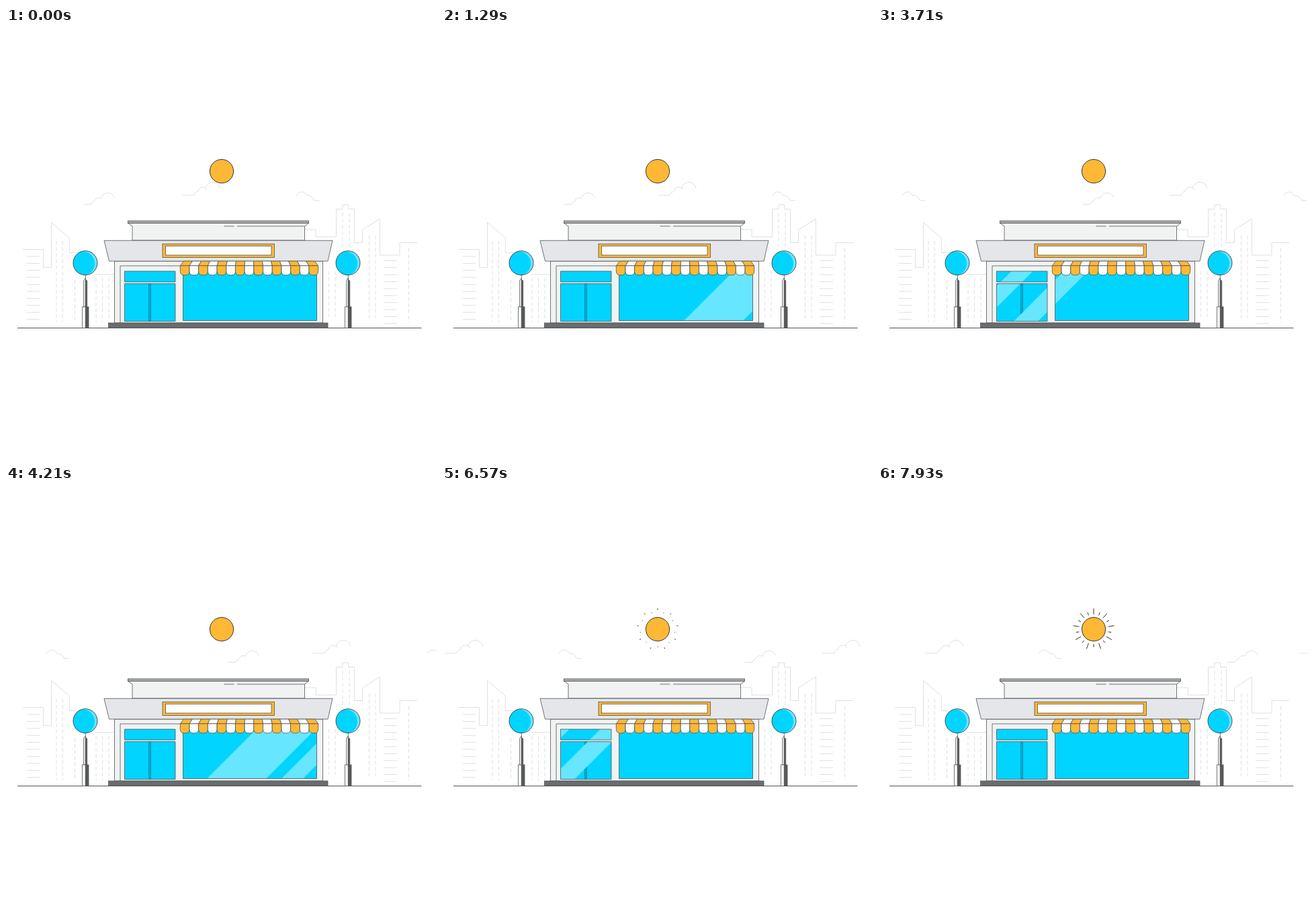
These frames come from a looping animation (640x640 px, 8 s). An HTML page:

```html
<!DOCTYPE html>
<html lang="en">
<head>
<meta charset="utf-8">
<title>Corner shop</title>
<style>
html, body { margin: 0; width: 100%; height: 100%; overflow: hidden; background: #fff; }
svg { display: block; width: 100vw; height: 100vh; }
.far { fill: none; stroke: #dcdcdc; stroke-width: .9; }
.dash { stroke-dasharray: 5.5 3.6; }
.ink { stroke: #505356; stroke-width: .8; }
.wall { fill: #f1f3f3; }
.glass { fill: #00d4ff; }
.shine { fill: #66e6ff; }
.gold { fill: #ffb836; }
.none { fill: none; }
</style>
</head>
<body>
<svg viewBox="0 0 640 640">
  <defs>
    <clipPath id="panes">
      <path d="M176.5 362H252V378H176.5ZM176.5 380.5H252V436.5H176.5ZM263.5 355H462.5V435.5H263.5Z"/>
    </clipPath>
    <clipPath id="crown"><circle cx="118" cy="349.7" r="18"/></clipPath>
    <g id="tree">
      <path class="ink none" d="M118.3 367V374"/>
      <path class="ink" fill="#fff" d="M115.6 415V376L118.3 372V415Z"/>
      <path class="ink" fill="#58595b" d="M118.3 374.5L120.7 376V415H118.3Z"/>
      <rect class="ink" fill="#fff" x="113.5" y="415" width="4.8" height="31.5"/>
      <rect class="ink" fill="#58595b" x="118.3" y="415" width="4.7" height="31.5"/>
      <circle class="shine" cx="118" cy="349.7" r="18"/>
      <circle class="glass" cx="114" cy="350.5" r="18" clip-path="url(#crown)"/>
      <circle class="none" cx="118" cy="349.7" r="18" stroke="#3c3f42" stroke-width=".9"/>
    </g>
    <g id="cloudA">
      <path d="M0 249H17.5Q19 244 23.5 243.3Q25 236.5 32 237Q36 238 37 241M34.5 238.5Q38 229.5 46 229.5Q54 230 56.5 238.5"/>
    </g>
    <g id="cloudB">
      <path d="M0 262.3H11.5Q13 258 16.5 257.6Q18 252.4 24.5 252.6L26 253.5Q29 245.4 37 245.4Q43 246 46 252"/>
    </g>
    <g id="cloudC">
      <path d="M0 249.3Q3 244 8.5 244Q13.5 244.5 15.5 249.3Q19 248.5 21 250.5Q25 252 26.5 256.7H34"/>
    </g>
  </defs>

  <g class="far">
    <path d="M25 329.5H55.5V356.3H67.5V289.5L94.3 312.5V334.5H106M133 366.7H161"/>
    <path d="M444 300H461V311H491.5V269.5H501V263H509.5V269.5H518.5V319.5H530.5V300.5L556.3 284V338H586V319.5H612"/>
    <path id="floors"/>
    <path class="dash" d="M75 317V438M84.5 317V438M102.5 375V438M134 372V438M143.5 372V438M153 372V438"/>
    <path class="dash" d="M501 275V331M511 275V331M480.3 362V430M490 362V430M540.5 309V432M550 309V432M599.5 328V438"/>
  </g>
  <g class="far" id="clouds"></g>

  <circle class="gold" cx="321" cy="213.2" r="17.6" stroke="#333" stroke-width="1"/>
  <path id="rays" class="none" stroke="#333" stroke-width="1"/>

  <path d="M17 446.5H618.5" stroke="#505356" stroke-width="1"/>
  <use href="#tree"/>
  <use href="#tree" x="391"/>

  <rect class="ink wall" x="161.5" y="347" width="310" height="92"/>
  <path class="ink none" d="M170 439V354H260"/>
  <rect class="ink" fill="#6a6c6e" x="152.5" y="439" width="326.5" height="7.3"/>
  <path class="ink wall" d="M188 316V295L181.5 290.5H450.5L444.5 295V316Z"/>
  <rect class="ink" fill="#a9abad" x="181.5" y="287" width="269" height="3.5"/>
  <path class="ink none" d="M324.5 295H339.5M344 295H444.5"/>
  <path class="ink" fill="#e4e6e9" d="M146 316.3H486L479 347H153.5Z"/>
  <rect class="ink gold" x="233" y="321.3" width="166.5" height="20.3"/>
  <rect class="ink" fill="#fff" x="237.5" y="324.5" width="157.5" height="13.5"/>

  <path class="glass" d="M176.5 362H252V378H176.5ZM176.5 380.5H252V436.5H176.5ZM263.5 355H462.5V435.5H263.5Z"/>
  <rect x="212.5" y="380.5" width="3" height="56" fill="#00a9d4" stroke="#087a99" stroke-width=".6"/>
  <g clip-path="url(#panes)"><path id="shine" class="shine"/></g>
  <path class="ink none" d="M176.5 362H252V378H176.5ZM176.5 380.5H252V436.5H176.5ZM263.5 355H462.5V435.5H263.5Z"/>
  <g id="awning" class="ink"></g>
</svg>
<script>
const LOOP = 8000;
const $ = id => document.getElementById(id);
const NS = 'http://www.w3.org/2000/svg';
const add = (parent, tag, attrs) => {
  const el = parent.appendChild(document.createElementNS(NS, tag));
  for (const k in attrs) el.setAttribute(k, attrs[k]);
  return el;
};
const ease = u => { u = Math.min(1, Math.max(0, u)); return u * u * (3 - 2 * u); };

let floors = '';
for (let i = 0; i < 10; i++) {
  const y = 340 + i * 10.4;
  floors += `M31 ${y}h19M562 ${y + 6.3}h20`;
}
$('floors').setAttribute('d', floors);

// Striped awning: slanted upper part and scalloped edge
const cells = 15, left = 259.3, cell = 205.4 / cells, mid = 362;
const lean = x => mid + (x - mid) * .95;
for (let i = 0; i < cells; i++) {
  const a = left + i * cell, b = a + cell;
  const fill = i % 2 ? '#fff' : '#ffb836';
  add($('awning'), 'path', { fill, d: `M${lean(a)} 347H${lean(b)}L${b} 353.8H${a}Z` });
  add($('awning'), 'path', { fill, d: `M${a} 353.8H${b}V361.5Q${b} 367.8 ${b - 5.5} 367.8H${a + 5.5}Q${a} 367.8 ${a} 361.5Z` });
}

// shape, x at start, px per ms
const clouds = [
  ['cloudA', 262, .0462], ['cloudA', -314.6, .0485],
  ['cloudB', 115.3, .051],
  ['cloudC', 432, .0463], ['cloudC', -142.8, .0482]
].map(([id, x, v]) => ({ x, v, el: add($('clouds'), 'use', { href: '#' + id }) }));

// Light bands: offsets behind the leading edge, measured along x + y
const bands = [[0, 36], [82, 114], [137, 225]];
const sweeps = [[860, 775], [3710, 674], [6570, 633]];
const SWEEP_SPEED = .57;

function shinePath(t) {
  let d = '';
  for (const [at, pos] of sweeps) {
    const lead = pos + (t - at) * SWEEP_SPEED;
    if (lead < 530 || lead > 1130) continue;
    for (const [near, far] of bands) {
      const a = lead - far, b = lead - near;
      d += `M${a - 350} 350H${b - 350}L${b - 440} 440H${a - 440}Z`;
    }
  }
  return d;
}

const pulses = [0, 1500, 3020, 4545, 6030, 7550];

function raysPath(t) {
  const p = t - pulses.filter(s => s <= t).pop();
  const tip = ease((p - 90) / 180), tail = ease((p - 390) / 220);
  if (tip - tail < .005) return '';
  let d = '';
  for (let i = 0; i < 18; i++) {
    const ang = i * Math.PI / 9, long = i % 2 === 0;
    const r0 = 22, len = long ? 9 : 4.6;
    const at = k => `${321 + Math.sin(ang) * (r0 + len * k)} ${213.2 - Math.cos(ang) * (r0 + len * k)}`;
    d += `M${at(tail)}L${at(tip)}`;
  }
  return d;
}

function draw(t) {
  for (const c of clouds) c.el.setAttribute('x', c.x + c.v * t);
  $('shine').setAttribute('d', shinePath(t));
  $('rays').setAttribute('d', raysPath(t));
}

const start = performance.now();
function tick() {
  draw((performance.now() - start) % LOOP);
  requestAnimationFrame(tick);
}
tick();
</script>
</body>
</html>
```
